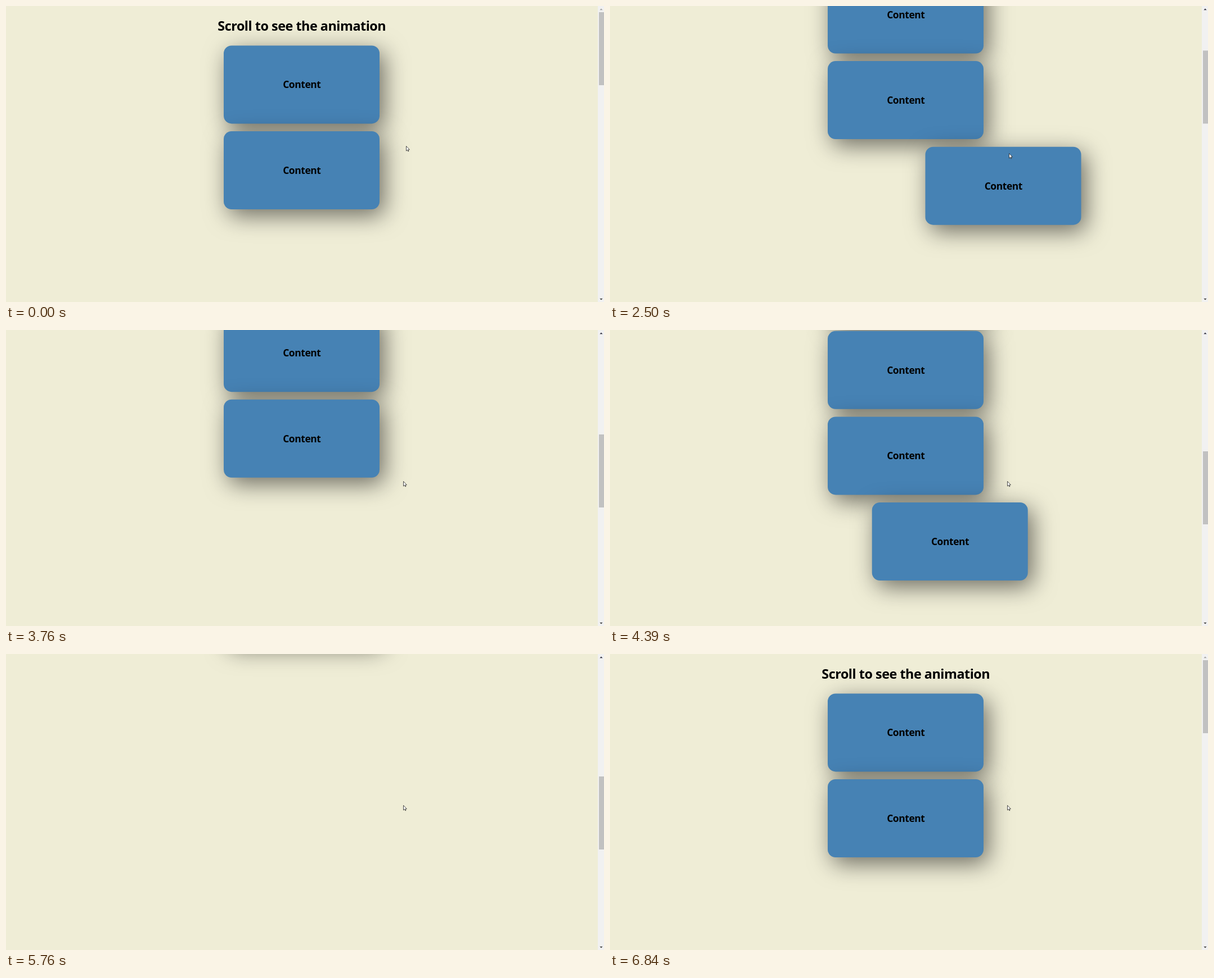
Write an HTML page that moves like this. It is 1063 px wide and 527 px high and loops after 7500 ms.

```html
<!DOCTYPE html>
<html lang="en">
<head>
<meta charset="utf-8">
<title>Scroll animation</title>
<style>
  html, body { margin: 0; width: 100%; height: 100%; overflow: hidden; background: #efedd6; }
  #stage { position: absolute; left: 0; top: 0; width: 1063px; height: 527px; overflow: hidden; background: #efedd6;
    font-family: "Open Sans", "Noto Sans", sans-serif; font-weight: 700; color: #000; }
  #page { position: absolute; left: 0; top: 0; width: 1051.5px; height: 527px; overflow: hidden; }
  #title { position: absolute; left: 0; top: 15px; width: 100%; margin: 0; text-align: center; white-space: nowrap;
    font-size: 23.3px; line-height: 40px; letter-spacing: -.45px; }
  .card { position: absolute; left: 387.2px; top: 0; width: 277.3px; height: 138.6px; border-radius: 14px;
    background: #4682b4; box-shadow: 8px 11px 42px rgba(0, 0, 0, .55);
    text-align: center; font-size: 17.4px; line-height: 138.6px; letter-spacing: -.4px; }
  #bar { position: absolute; left: 1052px; top: 0; width: 11px; height: 527px; background: #f1f1f1; }
  #thumb { position: absolute; left: 1.5px; top: 0; width: 9.5px; height: 130px; background: #c1c1c1; }
  svg { position: absolute; left: 0; top: 0; overflow: visible; }
</style>
</head>
<body>
<div id="stage">
  <div id="page"><h1 id="title">Scroll to see the animation</h1></div>
  <div id="bar">
    <div id="thumb"></div>
    <svg width="11" height="527">
      <path id="up" d="M3.4 7.3L6 4.5 8.6 7.3Z"/>
      <path id="down" d="M3.4 520.7L6 523.5 8.6 520.7Z"/>
    </svg>
  </div>
  <svg id="cursor" width="8" height="12">
    <path d="M.5 .5V9L2.6 7.2 3.9 10 4.9 9.5 3.8 6.8H6.4Z" fill="#fff" stroke="#222" stroke-width=".8"/>
  </svg>
</div>
<script>
const LOOP = 7500, STEP = 70, SLIDE = 400;
const COUNT = 13, TOP = 70.4, PITCH = 152.6, AWAY = 277.3 * 4;
const NOTCH = 69.3, MAX = 1520, TRIGGER = 316;
const END = MAX / NOTCH;

// [time, wheel notches]
const scrollKeys = [
  [1430, 0], [1660, .8], [1740, 1.234], [2280, 3.06], [2500, 4.004], [3680, 9.6], [3760, 10.24],
  [4119, 11.87], [4160, 12], [4690, 12], [5350, 6], [5650, 6], [5690, 7.5], [5760, 12.12],
  [5830, 18.5], [5900, END], [6580, END], [6680, 0]
];
// [time, x, y]
const cursorKeys = [
  [700, 711, 249], [800, 709, 249], [1430, 709, 249], [1740, 709, 256],
  [2500, 709, 262], [3300, 709, 262], [3760, 706, 269]
];
// Moments at which the stepped clock restarts; pauses simply repeat the same picture.
const anchors = [0, 730, 800, 1460, 2150, 4730, 5690, 6310, 6640, 6840];

function track(keys, t, col = 1) {
  if (t <= keys[0][0]) return keys[0][col];
  for (let i = 1; i < keys.length; i++) {
    const a = keys[i - 1], b = keys[i];
    if (t <= b[0]) return a[col] + (b[col] - a[col]) * (t - a[0]) / (b[0] - a[0]);
  }
  return keys[keys.length - 1][col];
}

// cubic-bezier(.25, .1, .25, 1)
function ease(x) {
  if (x <= 0) return 0;
  if (x >= 1) return 1;
  let lo = 0, hi = 1, u;
  for (let i = 0; i < 24; i++) {
    u = (lo + hi) / 2;
    if (.75 * u * (1 - u) + u ** 3 < x) lo = u; else hi = u;
  }
  return .3 * u * (1 - u) ** 2 + 3 * u * u * (1 - u) + u ** 3;
}

const scrollAt = t => track(scrollKeys, t) * NOTCH;
const cardTop = (i, scroll) => TOP + i * PITCH - scroll;

function offsetAt(slides, t) {
  let s = slides[0];
  for (const next of slides) if (next.t <= t) s = next;
  return s.from + (s.to - s.from) * ease((t - s.t) / SLIDE);
}

// Every slide in or out of one card, found from the scroll position.
function findSlides(i) {
  const goal = t => cardTop(i, scrollAt(t)) < TRIGGER ? 0 : AWAY;
  const start = goal(0), slides = [{ t: 0, from: start, to: start }];
  for (let t = 0; t < LOOP; t += 2) {
    const to = goal(t);
    if (to !== slides[slides.length - 1].to) slides.push({ t, from: offsetAt(slides, t), to });
  }
  return slides;
}

const $ = id => document.getElementById(id);
const cards = Array.from({ length: COUNT }, (_, i) => {
  const el = document.createElement("div");
  el.className = "card";
  el.textContent = "Content";
  $("page").append(el);
  return { el, slides: findSlides(i) };
});

const move = (el, x, y) => { el.style.transform = `translate(${x.toFixed(2)}px, ${y.toFixed(2)}px)`; };

function draw(t) {
  const scroll = scrollAt(t);
  move($("title"), 0, -scroll);
  cards.forEach((c, i) => move(c.el, offsetAt(c.slides, t), cardTop(i, scroll)));
  move($("thumb"), 0, 11 + scroll * .2465);
  $("up").style.fill = scroll > 0 ? "#303040" : "#a3a3a3";
  $("down").style.fill = scroll < MAX - .5 ? "#404040" : "#a3a3a3";
  move($("cursor"), track(cursorKeys, t), track(cursorKeys, t, 2));
}

function stepped(t) {
  const a = anchors.filter(v => v <= t).pop();
  return a + Math.floor((t - a) / STEP) * STEP;
}

const begin = performance.now();
function tick() {
  draw(stepped((performance.now() - begin) % LOOP));
  requestAnimationFrame(tick);
}
tick();
</script>
</body>
</html>
```
